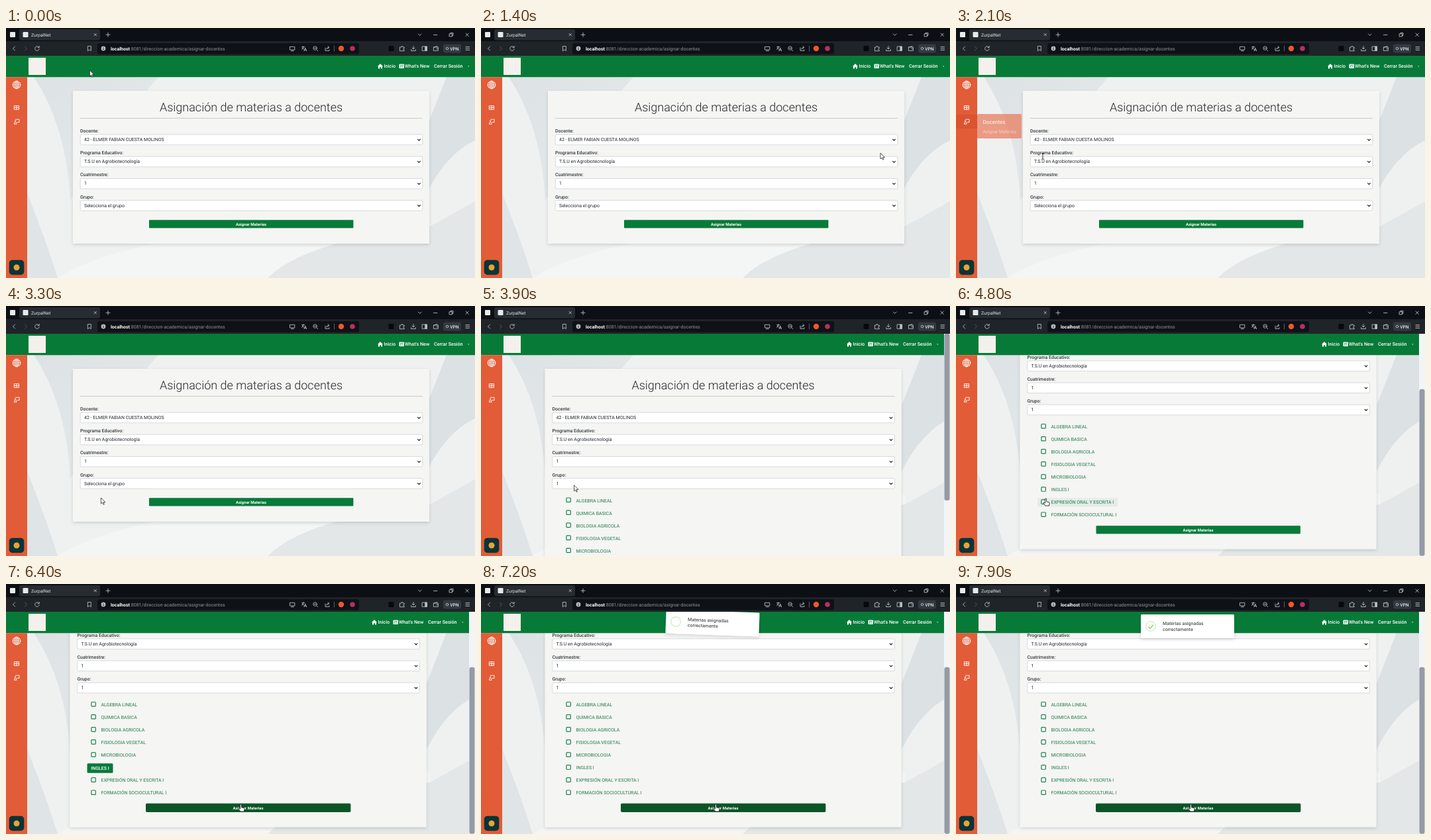
An HTML page that plays this animation: 708 px wide and 378 px high, repeating every 8000 ms.

```html
<!DOCTYPE html>
<html lang="es">
<head>
<meta charset="utf-8">
<title>Asignación de materias</title>
<style>
html, body { margin: 0; width: 100%; height: 100%; overflow: hidden; background: #eceff0; }
svg { display: block; width: 708px; height: 378px; font: 7px Roboto, "Open Sans", sans-serif; text-rendering: geometricPrecision; }
text { white-space: pre; }
.line { fill: none; stroke: #b9bec3; stroke-width: .9; stroke-linecap: round; stroke-linejoin: round; }
.white { stroke: #fff; }
.label { font-weight: 500; fill: #33383c; }
.value { fill: #212529; }
.nav { font-size: 7.2px; font-weight: 500; fill: #fff; }
.bold { font-weight: 700; fill: #fff; }
</style>
</head>
<body>
<svg viewBox="0 0 708 378">
  <defs>
    <linearGradient id="fade" x1="0" y1="0" x2="1" y2="1">
      <stop offset="0" stop-color="#dde2e4"/><stop offset="1" stop-color="#e6eaeb"/>
    </linearGradient>
    <filter id="shadow" x="-10%" y="-20%" width="120%" height="150%">
      <feDropShadow dx="0" dy="2" stdDeviation="2.5" flood-opacity=".14"/>
    </filter>
  </defs>

  <!-- backdrop -->
  <path d="M0 42H708V378H0z" fill="#eff1f1"/>
  <path d="M42 74H230Q130 190 97 262Q92 150 42 74z" fill="url(#fade)"/>
  <path d="M32 250Q60 320 78 378H32z" fill="#dfe4e6"/>
  <path d="M78 378Q200 300 640 285V326Q450 330 395 378z" fill="#f4f5f5"/>
  <path d="M395 378Q450 322 640 300L708 262V378z" fill="#e3e7e8"/>
  <path d="M665 74H708V170Q665 190 635 250V150z" fill="#dce1e4"/>

  <g id="page">
    <rect id="card" x="101" y="95" width="538" height="231" fill="#f5f5f3" filter="url(#shadow)"/>
    <text x="370" y="126" text-anchor="middle" font-size="18" font-weight="300" fill="#212529">Asignación de materias a docentes</text>
    <path d="M112 136.5H629" stroke="#c9cac9"/>
    <g id="fields"></g>
    <g id="rows"></g>
    <g id="button">
      <rect id="face" x="216" y="290.3" width="308.4" height="12.2" rx="1" fill="#087a39"/>
      <text class="bold" x="370" y="298.7" text-anchor="middle" font-size="6">Asignar Materias</text>
    </g>
  </g>

  <!-- site header -->
  <path d="M0 42H708V74.3H0z" fill="#087a37"/>
  <rect x="34" y="45" width="26" height="26" fill="#f4f1ec"/>
  <g id="menu">
    <path d="M561 58l4-4 4 4h-1v3.6h-2v-2.4h-2v2.4h-2V58z" fill="#fff"/>
    <text class="nav" x="570.5" y="60.4">Inicio</text>
    <rect x="593.5" y="54.5" width="7.5" height="6.5" rx="1" fill="#fff"/>
    <path d="M595 56.3h4.6M595 57.8h2M598 57.8h1.6M595 59.3h2M598 59.3h1.6" stroke="#087a37" stroke-width=".7"/>
    <text class="nav" x="602" y="60.4">What's New</text>
    <text class="nav" x="646" y="60.4">Cerrar Sesión</text>
    <path d="M697 57.5h2.4l-1.2 1.2z" fill="#fff"/>
  </g>
  <g id="bar">
    <path d="M699 42h9V378h-9z" fill="#f3f4f5"/>
    <rect id="thumb" x="699.5" y="42" width="8" height="252" rx="3" fill="#949aa6"/>
  </g>

  <!-- sidebar -->
  <path d="M0 74.3H32V378H0z" fill="#e25c37"/>
  <path id="item" d="M0 131H32V152H0z" fill="#cf4c29"/>
  <g class="line white">
    <circle cx="16" cy="86" r="5.8"/>
    <ellipse cx="16" cy="86" rx="2.6" ry="5.8"/>
    <path d="M10.2 86H21.8M11.2 83h9.6M11.2 89h9.6M16 80.2v11.6"/>
    <path d="M12.7 117.7h6.8v5.6h-6.8zM12.7 120.5h6.8M16 117.7v5.6"/>
    <path d="M14.5 138.2h5.5v4.3h-3M12.3 144.8q.2-2.6 1.9-2.6t1.9 2.6z"/>
    <circle cx="14" cy="140.6" r=".7"/>
  </g>
  <g id="panel">
    <rect x="32" y="130" width="67" height="37" rx="1.5" fill="#e8714f"/>
    <text x="40.5" y="144.5" font-size="8.1" fill="#fff">Docentes</text>
    <text x="40.5" y="158.5" font-size="6.7" fill="#fff" fill-opacity=".6">Asignar Materias</text>
  </g>
  <rect x="4.7" y="350.7" width="22.6" height="22.6" rx="5" fill="#0b3436"/>
  <circle cx="16" cy="362" r="4.5" fill="#e9a13b"/>

  <g id="toast">
    <rect x="279" y="46" width="141" height="36" rx="1.5" fill="#fff" filter="url(#shadow)"/>
    <circle cx="294" cy="64" r="7.3" fill="none" stroke="#d3edc3" stroke-width="1.3"/>
    <path id="tick" d="M290.5 64.4l2.6 2.7 5-5.6" fill="none" stroke="#8fd468" stroke-width="1.4" stroke-dasharray="12"/>
    <g font-weight="500" fill="#545454">
      <text x="312" y="62.4">Materias asignadas</text>
      <text x="312" y="70.9">correctamente</text>
    </g>
  </g>

  <!-- browser window -->
  <path d="M0 0H708V21H0z" fill="#0c1014"/>
  <path d="M0 20H708V42H0z" fill="#1f2429"/>
  <rect x="20" y="2" width="122" height="16.5" rx="3" fill="#262c32"/>
  <rect x="6" y="6" width="8" height="8" rx="1" fill="#e6ebe9"/>
  <rect x="25.5" y="6" width="8" height="8" rx="1" fill="#e6ebe9"/>
  <text x="38" y="12.5" font-size="6.7" fill="#e4e6e8">ZurpalNet</text>
  <rect x="138" y="23" width="395" height="16.5" rx="3" fill="#0e1216"/>
  <text x="158" y="33.6" font-size="7.1" fill="#8e949b"><tspan class="bold" font-size="7">localhost</tspan>:8081/direccion-academica/asignar-docentes</text>
  <g class="line">
    <path d="M133 8.4l3.4 3.4m0-3.4L133 11.8M151 10.2h6M154 7.2v6M622.3 9l2.3 2.3L627 9M645.5 10.4h5.5M669.5 8.8h4v4h-4zM671 8.6V7.3h4v4h-1.3M694 8l4.4 4.4m0-4.4L694 12.4"/>
    <path d="M13.5 28l-3 3 3 3"/>
    <path d="M28.5 28l3 3-3 3" stroke="#555c63"/>
    <path d="M49.6 29a3.3 3.3 0 1 0 .6 2.8M50.2 27.4v2.2h-2.2M123.7 27.5h4.6v7l-2.3-1.8-2.3 1.8z"/>
    <path d="M428.8 28.3h7v4.6h-7zM430.5 34.6h3.8"/>
    <path d="M446.5 28.7h4.5M448.8 27.6v1.1q-.2 2.5-2.3 3.6M447.5 30.4l2.6 2M450 34.7l1.8-4.5 1.8 4.5M450.7 33.3h2.2"/>
    <circle cx="466.6" cy="30.5" r="2.8"/>
    <path d="M468.7 32.6l2 2M465.3 30.5h2.6"/>
    <path d="M482 30v4.3h6v-1.5M483.8 32q.2-2.7 3.8-2.7M486 27.5l1.9 1.8-1.9 1.8"/>
    <path d="M495.5 27v8" stroke="#60666c"/>
    <path d="M594.8 29h2q0-1.6 1.2-1.6t1.2 1.6h2v2q-1.6 0-1.6 1.2t1.6 1.2v1.3h-6.4z"/>
    <path d="M615 27.5v4.3M613 30l2 2 2-2M611.7 32.5v2h6.6v-2M628.5 28h7v6.3h-7z"/>
    <path d="M633 28h2.5v6.3H633z" fill="#b9bec3"/>
    <path d="M645.8 29h6.6v5.3h-6.6zM645.8 29l5-1.4V29M650 31.6h2.4"/>
    <path d="M694 28.6h5.6M694 31h5.6M694 33.4h5.6"/>
  </g>
  <circle cx="147" cy="31" r="3.4" fill="#b9bec3"/>
  <path d="M147 29v.8M147 30.8v2.2" stroke="#0e1216"/>
  <circle cx="506" cy="31" r="4.2" fill="#f0562d"/>
  <circle cx="523" cy="31" r="3.8" fill="#b8305f"/>
  <rect x="577.5" y="27" width="8" height="8" rx="1" fill="#08090b"/>
  <rect x="660" y="24.5" width="27" height="13" rx="3" fill="#343a41"/>
  <circle cx="666" cy="31" r="1.8" class="line"/>
  <text x="670.2" y="33.5" font-size="6.7" font-weight="500" fill="#e4e6e8">VPN</text>

  <g id="cursor" stroke-linejoin="round">
    <path id="arrow" d="M0 0V9l2.1-1.9 1.4 3.2 1.4-.6-1.4-3.1h2.9z" fill="#fff" stroke="#111" stroke-width=".7"/>
    <path id="hand" d="M-1 1a1 1 0 0 1 2 0v3.8l3.6.8q1 .3.9 1.4l-.6 4H-.6l-2.8-4q-.3-1.3 1-1L-1 7z" fill="#fff" stroke="#111" stroke-width=".8"/>
    <path id="beam" d="M-1.8-4.5Q0-4.5 0-3.5Q0-4.5 1.8-4.5M0-3.5V3.5M-1.8 4.5Q0 4.5 0 3.5Q0 4.5 1.8 4.5" fill="none" stroke="#222" stroke-width=".9"/>
  </g>
</svg>
<script>
const $ = id => document.getElementById(id);
const set = (id, attrs) => { for (const k in attrs) $(id).setAttribute(k, attrs[k]); };
const show = (id, on) => set(id, { opacity: +on });
const ramp = (t, a, b) => Math.min(1, Math.max(0, (t - a) / (b - a)));
const pulse = (t, a, b, fade) => ramp(t, a, a + fade) * (1 - ramp(t, b, b + fade));

const fields = [
  ['Docente:', '42 - ELMER FABIAN CUESTA MOLINOS'],
  ['Programa Educativo:', 'T.S.U en Agrobiotecnología'],
  ['Cuatrimestre:', '1'],
  ['Grupo:', 'Selecciona el grupo']
];
const subjects = ['ALGEBRA LINEAL', 'QUIMICA BASICA', 'BIOLOGIA AGRICOLA', 'FISIOLOGIA VEGETAL',
  'MICROBIOLOGIA', 'INGLES I', 'EXPRESIÓN ORAL Y ESCRITA I', 'FORMACIÓN SOCIOCULTURAL I'];
const PICK = 5;

$('fields').innerHTML = fields.map(([label, value], i) => `
  <g transform="translate(112 ${155.5 + 33.2 * i})">
    <text class="label" y="2.5">${label}</text>
    <rect x=".2" y="5.6" width="516.6" height="15.6" rx="1.5" fill="#fff" stroke="#cdd2d6" stroke-width=".8"/>
    <text class="value" id="value${i}" x="6" y="15.6">${value}</text>
    <path d="M509.3 12.4l2.2 2.2 2.2-2.2" fill="none" stroke="#222" stroke-width="1.2"/>
  </g>`).join('');

$('rows').innerHTML = subjects.map((name, i) => `
  <g transform="translate(0 ${294 + 19.07 * i})">
    <rect id="hover${i}" x="127.5" y="-6.5" height="13" rx="1" fill="#e5ece8"/>
    <g id="row${i}">
      <rect x="133.4" y="-4" width="6.4" height="6.4" rx="1" fill="#fbfbfa" stroke="#16804a" stroke-width="1.2"/>
      <text id="name${i}" x="148" y="2.5" fill="#1d7a48">${name}</text>
    </g>
  </g>`).join('') + `
  <g id="picked" transform="translate(0 ${294 + 19.07 * PICK})">
    <rect x="127" y="-6.5" width="39" height="14.3" rx="1.5" fill="#087a39"/>
    <text x="132.8" y="2.8" class="label" style="fill:#fff">${subjects[PICK]}</text>
  </g>`;
subjects.forEach((_, i) => set('hover' + i, { width: $('name' + i).getComputedTextLength() + 26 }));

// time, x, y
const path = [
  [0, 126.5, 64], [100, 126.5, 64], [800, 603, 189], [1400, 603, 189], [1750, 58, 146],
  [1900, 70, 152], [2100, 131, 194], [2200, 134, 199], [2300, 134, 199], [2700, 148, 267],
  [3000, 148, 267], [3300, 143.5, 290], [3700, 143.5, 290], [3850, 141, 270], [4200, 132.5, 286],
  [4500, 132.5, 286], [4800, 135.5, 291], [5000, 137, 321], [5300, 139, 277], [5500, 139, 277],
  [6300, 354.5, 333], [8000, 354.5, 333]
];
// row, start, end
const hovers = [[0, 3950, 4200], [6, 4600, 4900], [7, 4900, 5100], [6, 5100, 5200], [5, 5200, 5600]];

function pointer(t) {
  const i = Math.max(1, path.findIndex(p => p[0] >= t));
  const [a, b] = [path[i - 1], path[i]];
  const u = ramp(t, a[0], b[0]), e = u * u * (3 - 2 * u);
  return [a[1] + (b[1] - a[1]) * e, a[2] + (b[2] - a[2]) * e];
}

function draw(t) {
  const listed = t >= 3900, picked = t >= 5400 && t < 7200;
  const scroll = 111.5 * ramp(t, 4200, 4500);

  set('page', { transform: `translate(${listed ? -4.5 : 0} ${-scroll})` });
  set('card', { height: listed ? 384 : 231 });
  set('button', { transform: `translate(0 ${listed ? 153.4 : 0})` });
  set('menu', { transform: `translate(${listed ? -9 : 0} 0)` });
  set('thumb', { y: 42 + scroll * 336 / 447.5 });
  show('rows', listed);
  show('bar', listed);
  $('value3').textContent = listed ? '1' : fields[3][1];

  subjects.forEach((_, i) => show('hover' + i,
    Math.max(0, ...hovers.map(([row, a, b]) => row === i ? pulse(t, a, b, 150) : 0))));
  show('row' + PICK, !picked);
  show('hover' + PICK, picked ? 0 : $('hover' + PICK).getAttribute('opacity'));
  show('picked', picked);

  const dark = ramp(t, 6100, 6400), pressed = t >= 6900 && t < 7100;
  set('face', {
    fill: `rgb(${8 + 2 * dark} ${122 - 38 * dark} ${57 - 19 * dark})`,
    stroke: dark ? '#0a5426' : 'none',
    'stroke-width': pressed ? 2 : 1
  });

  const menu = pulse(t, 1650, 2000, 300);
  show('panel', menu);
  show('item', menu * .7);

  const u = ramp(t, 7200, 7700);
  const tilt = u < .33 ? 2 - 12 * u : u < .66 ? -2 + 12 * (u - .33) : 2 - 2 * (u - .66) / .34;
  const drop = u < .66 ? -5 + 7.5 * u / .66 : 2.5 * (1 - u) / .34;
  set('toast', { transform: `translate(0 ${drop}) rotate(${tilt} 349.5 64)` });
  show('toast', t >= 7200);
  set('tick', { 'stroke-dashoffset': 12 * (1 - ramp(t, 7300, 7700)) });

  const hand = (t >= 4600 && t < 5600) || t >= 6200, beam = t >= 2000 && t < 2300;
  set('cursor', { transform: `translate(${pointer(t)})` });
  show('hand', hand);
  show('beam', beam);
  show('arrow', !hand && !beam);
}

// the screen is refreshed ten times a second
let start;
function loop(now) {
  start ??= now;
  draw(Math.floor((now - start) % 8000 / 100) * 100);
  requestAnimationFrame(loop);
}
draw(0);
requestAnimationFrame(loop);
</script>
</body>
</html>
```
